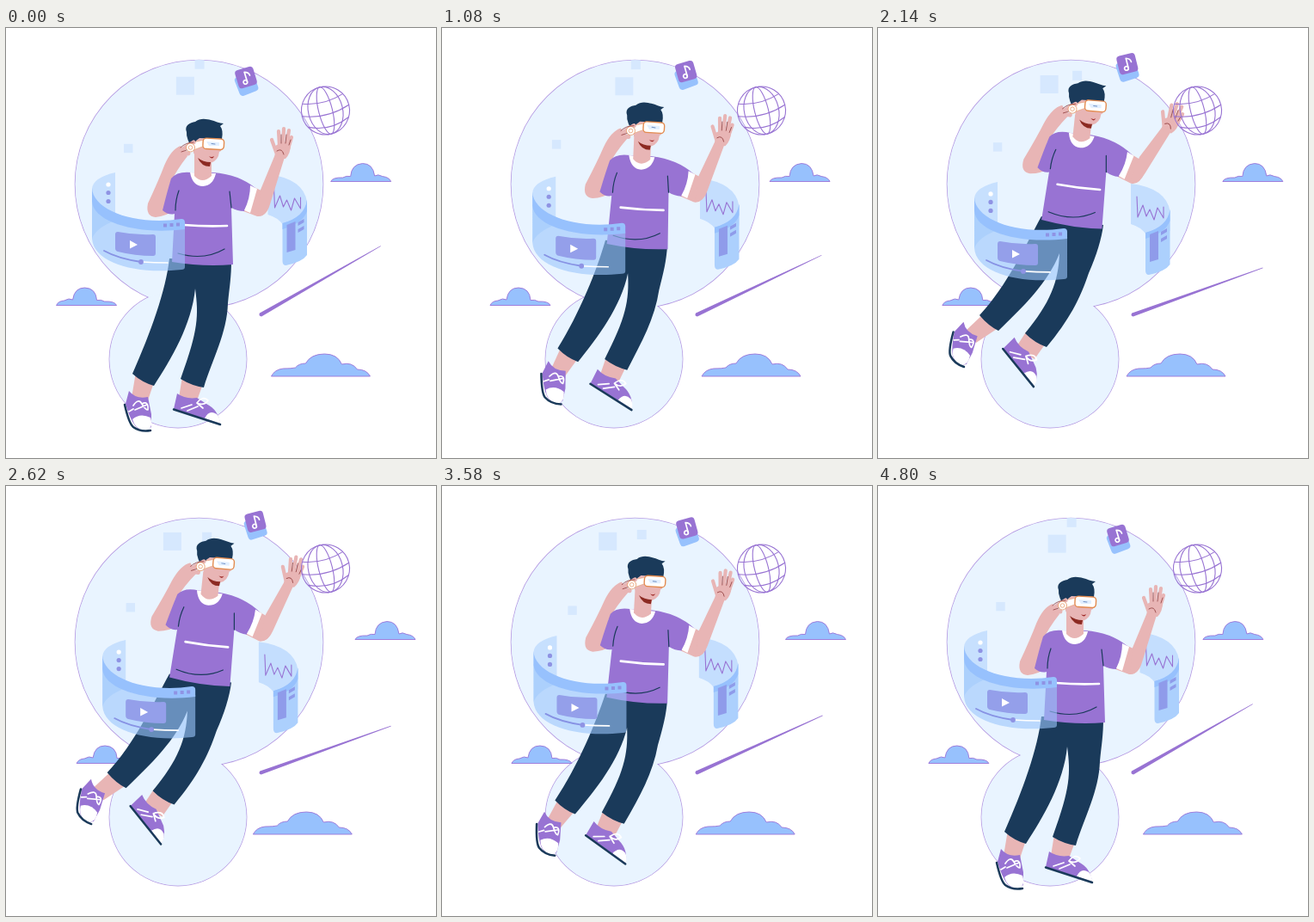
Write an HTML page that moves like this. It is 500 px wide and 500 px high and loops after 4.82 s.

```html
<!DOCTYPE html>
<html lang="en">
<head>
<meta charset="utf-8">
<style>
  html, body { margin: 0; width: 100%; height: 100%; overflow: hidden; background: #fff; }
  svg { display: block; width: 100vw; height: 100vh; }
  .line { fill: none; stroke-linecap: round; stroke-linejoin: round; }
  .navy { fill: #1a3a5a; }
  .purple { fill: #9873d3; }
  .skin { fill: #e8b5b5; }
  .fade { fill: #d6e8fe; }
  .cloud { fill: #97c1fd; stroke: #9b74d8; stroke-width: .9; }
  .ink { stroke: #1a3a5a; stroke-width: 1.2; }
  .crease { stroke: #8f3b3b; stroke-width: .8; }
  .white { stroke: #fff; stroke-width: 1.7; }
  .violet { stroke: #9873d3; stroke-width: 1.1; }
  .finger { stroke: #e8b5b5; stroke-width: 5; }
</style>
</head>
<body>
<svg viewBox="0 0 500 500">
  <clipPath id="disc"><circle cx="224.5" cy="181.5" r="144.5"/></clipPath>

  <g fill="#e9f4ff">
    <g stroke="#9b74d8" stroke-width="1.2" stroke-opacity=".7">
      <circle cx="224.5" cy="181.5" r="144.2"/><circle cx="200" cy="385" r="79.8"/>
    </g>
    <circle cx="224.5" cy="181.5" r="144"/><circle cx="200" cy="385" r="79.6"/>
  </g>
  <g clip-path="url(#disc)" class="fade">
    <rect id="squareA" x="-10.5" y="-10.5" width="21" height="21"/>
    <rect id="squareB" x="-5.5" y="-5.5" width="11" height="11"/>
    <rect id="squareC" x="-5.2" y="-5.2" width="10.4" height="10.4"/>
  </g>

  <g class="cloud">
    <path id="cloudLeft" d="M0 0Q2-5 9-5.500Q15-9 19-6.500Q21-20.500 33-20.500Q46-20 47-6Q52-7 56-4.500Q68-5 70 0Z"/>
    <path id="cloudRight" d="M0 0Q2-5 14-4.500Q18-7 23-6Q24-20 37-21Q49-21 51-6.500Q55-9 60-6Q68-5 70 0Z"/>
    <path id="cloudLow" d="M0 0Q4-8 14-9Q24-9 28-10Q32-15 40-15Q46-26 62-26Q77-26 82-14Q94-17 100-8Q111-8 115 0Z"/>
  </g>

  <path id="beam" d="M0-2.200L161-.4V.4L0 2.200Q-3 0 0-2.200Z" class="purple"/>

  <g id="music">
    <rect x="-11.500" y="-7" width="23" height="23" rx="4" transform="rotate(-21)" fill="#97c1fd"/>
    <g transform="translate(1 -3.500) rotate(-17)">
      <rect x="-11" y="-11" width="22" height="22" rx="4" class="purple"/>
      <path d="M0 5V-6.500Q5-5 5-1" class="line white"/>
      <circle cx="-2.200" cy="5" r="2.300" class="line white"/>
    </g>
  </g>

  <g id="screenRight">
    <path d="M294 181Q335 186 339.500 213V236L312 240Q305 231 294 228Z" fill="#c4defe"/>
    <path d="M301 196L302 220L308 206L312 219L316 211L321 223L325 209L332 221V208" class="line violet"/>
    <path d="M311 238Q337 231 339.500 211V275Q334 283 315 287Q311 287 311 282Z" fill="#acd0fd"/>
    <path d="M311 238Q337 231 339.500 211V224Q335 238 311 245Z" fill="#97c1fd"/>
    <g fill="#8f9bea">
      <path d="M316 240L326 236V269L316 272Z"/>
      <path d="M329 237L336 233V237L329 241ZM329 245L336 241V245L329 249Z"/>
    </g>
  </g>

  <path id="ankleLeft" class="skin"/>
  <path id="ankleRight" class="skin"/>
  <g id="shoeLeft">
    <path d="M143 422Q151 432 165 429L169 449V464Q164 469 154 466Q146 461 139 437Z" class="purple"/>
    <path d="M147 455Q156 447 168 453Q172 466 162 468Q150 467 147 455Z" fill="#fff"/>
    <path d="M148 439Q154 430 158 437T165 444Q166 433 158 437M150 444L164 438M143 446L148 443" class="line white"/>
    <path d="M138 438Q143 460 148 464Q156 470 168 468" class="line" stroke="#1a3a5a" stroke-width="2.500"/>
  </g>
  <g id="shoeRight">
    <path d="M199 425Q209 432 222 430L233 437Q247 444 249 460L195 443Z" class="purple"/>
    <path d="M231 454Q236 443 245 449Q249 453 249 460Z" fill="#fff"/>
    <path d="M204 442L216 438M211 445L223 440M222 436Q229 427 235 433Q230 440 222 436L229 442" class="line white"/>
    <path d="M195 443.500L249 461" class="line" stroke="#1a3a5a" stroke-width="2.500"/>
  </g>
  <path id="trousers" class="navy"/>

  <g id="torso">
    <path d="M286 184L299 190L306 206Q302 220 292 219L276 213Z" class="skin"/>
    <g id="forearm">
      <path d="M296 188L313 147H325L307 205Q303 219 293 219Z" class="skin"/>
      <path d="M312 138Q321 131 331 135Q331 146 325 152H313Z" class="skin"/>
      <path d="M314 144L309 130M318 138L317 120M322 138L323 117M326 138L329 119M328 141L332 127" class="line finger" style="stroke-width:4.200"/>
      <path d="M320 134V124M325 134L326 124M329 136L331 130M315 143Q321 139 323 147" class="line crease"/>
    </g>
    <path d="M203 137Q192 141 184 160Q178 176 165 204Q162 219 174 220Q186 219 197 211L190 182Q199 164 211 149Z" class="skin"/>
    <path d="M216 168Q199 166 192 175Q188 188 182 212Q189 218 196 216L193 272Q230 278 264 275L262 209Q269 213 277 213L290 186Q270 170 241 168Z" class="purple"/>
    <path d="M284 183L292 187L284 215L277 212Q284 198 284 183Z" fill="#fff"/>
    <path d="M201 189Q197 200 197 212M260 190L262 209M200 262Q230 271 254 257" class="line ink"/>
    <path d="M207 229Q232 231 257 230" class="line white" style="stroke-width:2.600"/>
    <path d="M214 168Q217 184 229 184Q241 183 244 169Z" fill="#fff"/>
    <path d="M219 146V172Q228 182 239 172V154Z" class="skin"/>

    <g id="head">
      <path d="M218 120V145Q223 157 238 157Q247 154 248 144L250 143L249 120Z" class="skin"/>
      <path d="M223 151Q229 156 238 156L237 161Q227 161 223 151Z" fill="#8c2a22"/>
      <path d="M236 149Q239 151 242 149Q240 154 236 149Z" fill="#a02e2c"/>
      <path d="M218 143Q209 128 210 121C207 113 214 110 220 109C226 104 234 106 238 107C243 108 248 111 253 111L249 114Q253 119 251 129L225 128L221 131Z" class="navy"/>
      <path d="M212 134L231 130V137L215 143Z" fill="#fff" stroke="#e8a071" stroke-width=".6"/>
      <rect x="229" y="128.500" width="24.500" height="12.500" rx="4" transform="rotate(3 241 135)" fill="#fff" stroke="#e38b4f" stroke-width="1.400"/>
      <path d="M233 132L248 133V137L236 137Z" fill="#e2efff"/>
      <path d="M239 134.500L243 135" class="line" stroke="#6e8fc4"/>
      <path d="M204 142L218 133M205 145L212 146" class="line finger"/>
      <circle cx="214.500" cy="139" r="5" fill="#fff" stroke="#e8a071" stroke-width=".9"/>
      <circle cx="214.500" cy="139" r="2.300" fill="none" stroke="#e8a071" stroke-width=".8"/>
      <path d="M203 139Q209 133 218 133M204 144L210 142" class="line crease"/>
    </g>
  </g>

  <g id="screenLeft">
    <path d="M127 168Q101 174 100 187V245Q105 232 127 224Z" fill="#bddafe" opacity=".75"/>
    <path d="M100 200C102 225 150 241 208 232V278Q208 281 204 281C150 287 102 273 100 245Z" fill="#9cc6fc" opacity=".6"/>
    <path d="M100 186C101 212 150 230 204 222Q208 222 208 226V234C150 241 102 225 100 202Z" fill="#97c1fd"/>
    <path d="M130 237Q150 241 171 240Q174 240 174 243V262Q174 265 171 265Q150 265 130 260Q127 259 127 256V240Q127 237 130 237Z" fill="#949fea"/>
    <path d="M144 247L153 252L144 256.500Z" fill="#fff"/>
    <path d="M114 259Q130 268 157 272" class="line" stroke="#8792e4" stroke-width="1.800"/>
    <path d="M158 272Q172 273 188 273" class="line white"/>
    <circle cx="119" cy="182" r="2.600" fill="#fff"/>
    <g fill="#8f93e4">
      <circle cx="157" cy="272" r="2.900"/>
      <circle cx="119" cy="191.500" r="2.600"/><circle cx="119" cy="201.500" r="2.600"/>
      <path d="M183 227.500h4v4h-4zM190.500 227h4v4h-4zM198 226.500h4v4h-4z"/>
    </g>
  </g>

  <g class="line violet" transform="translate(371.500 96) rotate(-14)">
    <circle r="28"/>
    <ellipse rx="8" ry="28"/><ellipse rx="20" ry="28"/>
    <path d="M-28 0Q0 10 28 0M-24-14Q0-6 24-14M-24 14Q0 25 24 14"/>
  </g>
</svg>
<script>
const LOOP = 4820;
const el = id => document.getElementById(id);
const mix = (a, b, k) => a + (b - a) * k;
const place = (id, x, y, turn = 0, cx = 0, cy = 0) =>
  el(id).setAttribute('transform', `translate(${x} ${y}) rotate(${turn} ${cx} ${cy})`);
const bump = (t, peak, width) => Math.exp(-(((t - peak) / width) ** 2));

// Each limb blends between its lowest and its highest pose.
const limbs = {
  trousers: [
    'M190 268 C186 305 168 355 147 402 Q158 412 172 416 C192 385 216 345 220 303 C224 335 224 350 203 408 Q216 416 230 418 C240 385 257 355 258 320 C260 300 262 290 262 270 Z',
    'M190 219 C172 252 150 300 118 334 Q128 346 140 352 C168 325 198 296 211 262 C210 295 200 320 171 355 Q182 366 196 371 C222 340 235 315 245 285 C254 265 260 245 262 229 Z'],
  ankleLeft: ['M151 400 L172 412 L164 436 L146 430 Z', 'M122 333 L138 350 L114 366 L102 352 Z'],
  ankleRight: ['M205 405 L229 414 L221 436 L201 430 Z', 'M173 352 L194 368 L182 385 L160 372 Z']
};
const blend = (from, to, k) => {
  const ends = to.match(/\d+/g);
  let i = 0;
  return from.replace(/\d+/g, n => mix(+n, +ends[i++], k).toFixed(2));
};

function draw(now) {
  const t = now % LOOP;
  const wave = start => Math.cos((t - start) / LOOP * 2 * Math.PI);
  const lift = (1 - wave(0)) / 2;
  const pose = lift / .97;

  place('cloudLeft', 69 - 15.5 * wave(640), 322.5);
  place('cloudRight', 391 - 15.5 * wave(410), 178.5);
  place('cloudLow', 298 + 10.7 * wave(170), 405);
  place('squareA', 202 + 11 * wave(730), 66 + 2 * wave(730));
  place('squareB', 229 - 5 * wave(510), 50 - 10 * wave(510));
  place('squareC', 142.3 - 9.3 * wave(1205), 140 - 4.7 * wave(1205));
  place('beam', 296, 333.5, mix(-29.8, -19.5, lift));
  place('music', mix(278, 289, lift), mix(61, 44.5, lift), 3 * lift);
  place('screenLeft', 12.4 * lift, 11.3 * lift);
  place('screenRight', 10.5 * (1 - pose), -11 * (1 - pose));

  for (const id in limbs) el(id).setAttribute('d', blend(...limbs[id], pose));
  place('shoeLeft', -42 * pose, -72.5 * pose, 28 * pose, 158, 415);
  place('shoeRight', -39 * pose, -56 * pose, 33 * pose, 214, 418);
  place('torso', 7.3 * lift, -46 * lift, 6.2 * lift, 230, 175);
  place('head', 0, 0, -4.5 * lift, 230, 130);
  place('forearm', 0, 0, 10 * bump(t, 1950, 480) - bump(t, 3020, 400), 300, 205);
}

const start = performance.now();
(function tick() {
  draw(performance.now() - start);
  requestAnimationFrame(tick);
})();
</script>
</body>
</html>
```
